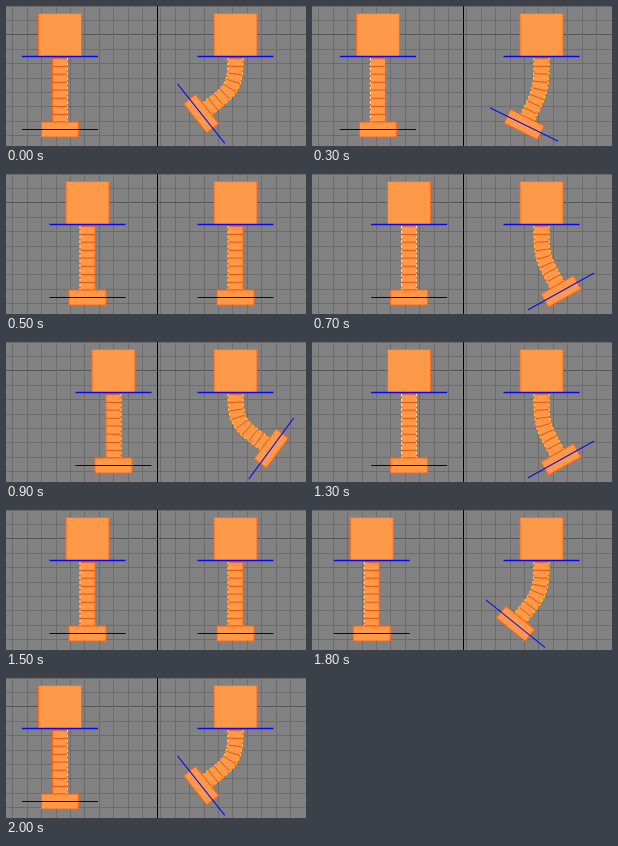
Animation of 300 by 140 pixels, one loop 2.1 s. Source, as an HTML page:

```html
<!DOCTYPE html>
<html lang="en">
<head>
<meta charset="utf-8">
<title>Flexible column</title>
<style>
html, body { margin: 0; width: 100%; height: 100%; overflow: hidden; background: #828282; }
svg { display: block; width: 300px; height: 140px; }
</style>
</head>
<body>
<svg id="stage" viewBox="0 0 300 140"></svg>
<script>
const FRAME = 100, FRAMES = 21;
const TOP = 52, LENGTH = 64, HALF = 7.5, SEGMENTS = 8, CELL = 14.4;
const FILL = '#ff994a', EDGE = '#ff6417', RIB = '#e8520c';
const BLUE = '#0808f0', YELLOW = '#ffe53b', PALE = '#fff0c0';
const stage = document.getElementById('stage');
const RAD = Math.PI / 180;

const line = (x1, y1, x2, y2, color, width = 1) =>
  `<path d="M${x1} ${y1}L${x2} ${y2}" stroke="${color}" stroke-width="${width}"/>`;

const rect = (x, y, w, h) =>
  `<rect x="${x}" y="${y}" width="${w}" height="${h}" fill="${FILL}" stroke="${EDGE}"/>`;

const polyline = points => 'M' + points.map(p => p.map(n => n.toFixed(2)).join(' ')).join('L');

function grid() {
  let out = '';
  for (let i = 0; i < 10; i++) {
    const step = i * CELL;
    for (const left of [6.8, 154.8]) {
      const x = Math.floor(left + step) + .5;
      out += line(x, 0, x, 140, '#6c6c6c');
    }
    const y = Math.floor(step) + .5;
    out += line(0, y, 300, y, i === 2 ? '#555' : '#6c6c6c');
  }
  return out + line(151.5, 0, 151.5, 140, '#000');
}

// Evenly spaced joints along a cubic that leaves the head straight and meets the foot square.
function spine(x, endX, endY, angle) {
  const handle = LENGTH * .48;
  const px = [x, x, endX + Math.sin(angle) * handle, endX];
  const py = [TOP, TOP + handle, endY - Math.cos(angle) * handle, endY];
  const samples = [];
  let length = 0;
  for (let i = 0; i <= 100; i++) {
    const t = i / 100, u = 1 - t;
    const at = p => u ** 3 * p[0] + 3 * u * u * t * p[1] + 3 * u * t * t * p[2] + t ** 3 * p[3];
    const slope = p => u * u * (p[1] - p[0]) + 2 * u * t * (p[2] - p[1]) + t * t * (p[3] - p[2]);
    const dx = slope(px), dy = slope(py), n = Math.hypot(dx, dy) || 1;
    const point = { x: at(px), y: at(py), nx: dy / n, ny: -dx / n };
    const last = samples[i - 1] || point;
    length += Math.hypot(point.x - last.x, point.y - last.y);
    samples.push({ ...point, length });
  }
  return Array.from({ length: SEGMENTS + 1 }, (_, i) =>
    samples.find(s => s.length >= length * i / SEGMENTS - 1e-6));
}

function figure(x, angle, sides, dots) {
  // The foot's middle swings out and rises as it turns.
  const footX = x - 38.2 * angle;
  const footY = 123.5 - 19 * Math.abs(angle) ** 1.7;
  const endX = footX + HALF * Math.sin(angle);
  const endY = footY - HALF * Math.cos(angle);
  const joints = spine(x, endX, endY, angle);
  const side = s => joints.map(p => [p.x + s * HALF * p.nx, p.y + s * HALF * p.ny]);
  const left = side(-1), right = side(1);
  const outline = polyline([...left, ...right.slice().reverse()]) + 'Z';
  const ribs = left.map((p, i) => polyline([p, right[i]])).join('');
  const dotted = (points, on) => on
    ? `<path d="${polyline(points)}" fill="none" stroke="${dots}" stroke-dasharray="2.6 2.2"/>` : '';
  return rect(x - 21.5, 7.5, 43, 43)
    + `<path d="${outline}" fill="${FILL}" stroke="${EDGE}"/>`
    + `<path d="${ribs}" stroke="${RIB}"/>`
    + dotted(left, sides !== 'right') + dotted(right, sides !== 'left')
    + line(x - 38, 50.5, x + 38, 50.5, BLUE, 1.3)
    + `<g transform="translate(${footX} ${footY}) rotate(${angle / RAD})">`
    + rect(-18.5, -7.5, 37, 15) + line(-38, 0, 38, 0, angle ? BLUE : '#080820') + '</g>';
}

function draw(time) {
  const frame = Math.floor(time / FRAME) % FRAMES;
  const p = 1 - Math.abs(frame - 10) / 10;
  const swing = 2 * p * p * (3 - 2 * p) - 1;
  const size = Math.abs(swing);
  const sides = size > .9 ? 'right' : swing > .4 && size < .75 ? 'both' : 'left';
  const angle = (swing > 0 ? -57.5 : 51.5) * size ** 1.2 * RAD;
  stage.innerHTML = backdrop
    + figure(81.5 + 27.5 * swing, 0, sides, size > .9 ? YELLOW : PALE)
    + figure(229.5, angle, size ? 'both' : 'left', YELLOW);
}

const backdrop = grid();
const start = performance.now();
function tick(now) {
  draw(Math.max(0, now - start));
  requestAnimationFrame(tick);
}
draw(0);
requestAnimationFrame(tick);
</script>
</body>
</html>
```
